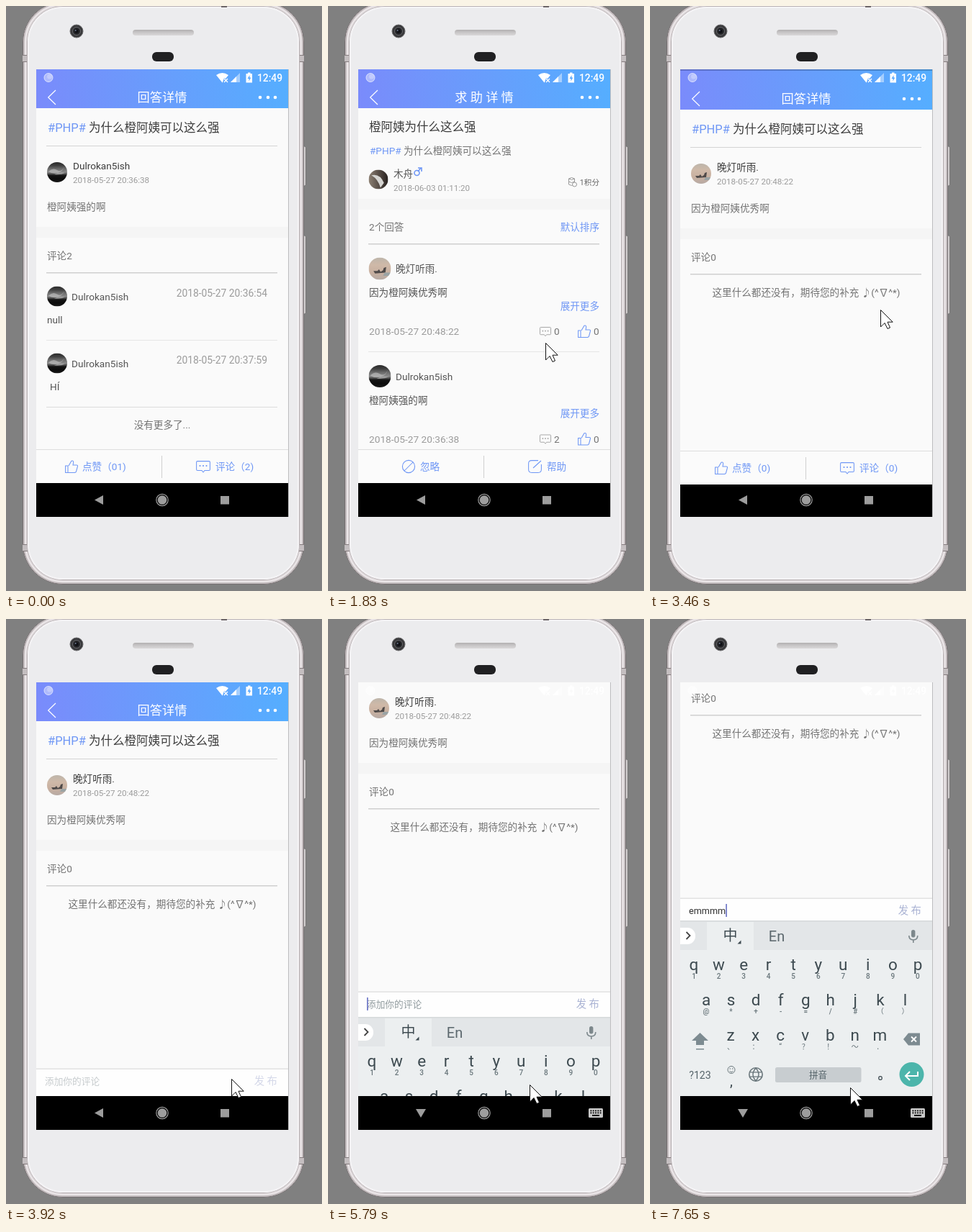
Recreate the animation shown at these times as an HTML page with a canvas. Size 439 by 813 pixels, loop 8 s.

```html
<!DOCTYPE html>
<html lang="zh-CN">
<head>
<meta charset="utf-8">
<title>Answer details</title>
<style>
html, body { margin: 0; width: 100%; height: 100%; overflow: hidden; background: #808080; }
canvas { display: block; }
</style>
</head>
<body>
<canvas id="stage" width="439" height="813"></canvas>
<script>
const W = 439, H = 813, LOOP = 8000;
const FONT = 'Roboto, "Noto Sans CJK SC", "Noto Sans CJK", sans-serif';
const BLUE = '#6f97f5', DARK = '#3c3c3c', MID = '#737373', SOFT = '#9b9b9b', KEY = '#3d4a50';
const USER = 'Dulrokan5ish', WRITER = '晚灯听雨.', STAR = '橙阿姨';
const QUESTION = ` 为什么${STAR}可以这么强`;
const screen = document.getElementById('stage').getContext('2d');
let c = screen;

const clamp = v => Math.max(0, Math.min(1, v));

function layer(draw) {
  const canvas = document.createElement('canvas');
  canvas.width = W;
  canvas.height = H;
  const previous = c;
  c = canvas.getContext('2d');
  draw();
  c = previous;
  return canvas;
}

// y is the optical middle of the line
function text(str, x, y, size, color, align = 'left', weight = 400) {
  c.font = `${weight} ${size}px ${FONT}`;
  c.textAlign = align;
  c.fillStyle = color;
  c.fillText(str, x, y + size * 0.36);
  return c.measureText(str).width;
}

function rect(x, y, w, h, color) {
  c.fillStyle = color;
  c.fillRect(x, y, w, h);
}

function round(x, y, w, h, r, fill, stroke, width = 1) {
  c.beginPath();
  c.roundRect(x, y, w, h, r);
  if (fill) { c.fillStyle = fill; c.fill(); }
  if (stroke) { c.strokeStyle = stroke; c.lineWidth = width; c.stroke(); }
}

const disc = (x, y, r, fill, stroke, width) => round(x - r, y - r, 2 * r, 2 * r, r, fill, stroke, width);

function path(d, x, y, fill, stroke, width = 1.05) {
  const p = new Path2D(d);
  c.save();
  c.translate(x, y);
  if (fill) { c.fillStyle = fill; c.fill(p); }
  if (stroke) { c.strokeStyle = stroke; c.lineWidth = width; c.stroke(p); }
  c.restore();
}

function gradient(x0, y0, x1, y1, ...colors) {
  const g = c.createLinearGradient(x0, y0, x1, y1);
  colors.forEach((color, i) => g.addColorStop(i / (colors.length - 1), color));
  return g;
}

const rule = (y, color = '#d4d4d4', h = 1) => rect(56, y, 321, h, color);

function thumb(x, y) {
  path('M.6 8H4V17.4H.6ZM5 8 9 1.2Q12 0 11.6 4L11 7H16Q18 7 17.4 9L15.5 16Q15 17.4 13.5 17.4H4', x, y, null, BLUE);
}

function bubble(x, y, s, color) {
  c.save();
  c.translate(x, y);
  c.scale(s, s);
  path('M2 .6H18Q19.4.6 19.4 2V12Q19.4 13.4 18 13.4H12L10 16 8 13.4H2Q.6 13.4.6 12V2Q.6.6 2 .6Z', 0, 0, null, color);
  for (const dx of [5.5, 10, 14.5]) disc(dx, 7, 1.1, color);
  c.restore();
}

function avatar(kind, x, y, r) {
  c.save();
  c.beginPath();
  c.arc(x, y, r, 0, 7);
  c.clip();
  c.translate(x, y);
  c.scale(r / 14, r / 14);
  if (kind === 'night') {
    rect(-14, -14, 28, 28, gradient(0, -14, 0, 14, '#2a2a2a', '#3f3f3f', '#6c6c6c', '#8a8a8a', '#141414', '#0c0c0c', '#1a1a1a'));
    path('M-12 -1Q-6 -7 0 -3T10 -8Q8 -1 1 1T-12 -1M-4 3Q3 -1 11 1 5 4 -4 3', 0, 0, 'rgba(205,205,205,.55)');
  } else if (kind === 'sand') {
    rect(-14, -14, 28, 28, gradient(0, -14, 0, 14, '#bdb5aa', '#cfb9a8', '#c8b0a0', '#b7aaa4'));
    path('M-8 3H-3L-1 1 1 4 4 2 5 -1 8 -2 7 5 -6 6Z', 0, 0, '#4f4a49');
    path('M6 5H14V9H4Z', 0, 0, '#9aa3a4');
  } else {
    rect(-14, -14, 28, 28, gradient(-14, 0, 14, 0, '#8c8073', '#5a5049', '#27211f'));
    path('M-10 -6Q2 -9 8 5L3 12Q0 0 -10 -6Z', 0, 0, '#d6d5d2');
  }
  c.restore();
}

function header(title) {
  rect(42, 88, 350, 575, '#fafafa');
  rect(42, 88, 350, 54, gradient(42, 130, 392, 100, '#7a8bfb', '#689dfc', '#55aeff'));
  path('M11 0 .7 10 11 20', 58, 117, null, '#fff', 1.2);
  for (const x of [353, 364, 374]) disc(x, 127, 2.3, '#fff');
  text(title, 217, 127, 17.2, '#fff', 'center');
}

function topic(y, size, color) {
  const w = text('#PHP#', 58, y, size, BLUE);
  text(QUESTION, 58 + w, y, size, color);
}

function footer() {
  rect(42, 617, 350, 46, '#fbfbfb');
  rect(42, 616, 350, 1, '#dedede');
  rect(216, 625, 1, 31, '#cfcfcf');
}

function answerPage({ face, name, date, body, count, likes, comments, bar }) {
  header('回答详情');
  topic(169.5, 16.5, DARK);
  rule(194);
  avatar(face, 71, 231, 14);
  text(name, 93, 222.5, 13.6, DARK);
  text(date, 93, 242, 11.6, SOFT);
  text(body, 57, 279, 13.6, MID);
  rect(42, 307, 350, 15, '#f5f5f5');
  text('评论' + count, 57, 347, 13.6, MID);
  rule(370, '#d0d0d0', 1.5);
  comments.forEach(([when, words, x], i) => {
    const y = i * 93;
    avatar('night', 71, 403.5 + y, 14);
    text(USER, 91, 404 + y, 13.6, '#555');
    text(when, 363, 399 + y, 13.8, SOFT, 'right');
    text(words, x, 436 + y, 13.6, '#555');
    rule(464 + y, i ? '#dcdcdc' : '#e6e6e6');
  });
  if (comments.length) text('没有更多了...', 217, 582, 13.6, MID, 'center');
  else text('这里什么都还没有，期待您的补充 ♪(^∇^*)', 217, 396, 13.6, MID, 'center');
  if (!bar) return;
  footer();
  const x = likes.length > 1 ? 82 : 90;
  thumb(x, 631);
  text(`点赞（${likes})`, x + 24, 640.5, 13.6, BLUE);
  bubble(264, 632, 1, BLUE);
  text(`评论（${count})`, 291, 640.5, 13.6, BLUE);
}

function helpPage() {
  header('求 助 详 情');
  text(STAR + '为什么这么强', 57, 168, 16.5, DARK);
  topic(201, 13.6, MID);
  avatar('child', 70, 241, 13.5);
  text('木舟', 91, 233, 13.6, '#555');
  disc(123.5, 232, 3.5, null, BLUE, 1.6);
  path('M0 5 4 0M0 0H5V5', 125, 225, null, BLUE, 1.6);
  text('2018-06-03 01:11:20', 91, 253, 11.6, SOFT);
  path('M0 2Q4 -1 8 2V10Q4 13 0 10ZM0 2Q4 5 8 2M0 6Q4 9 8 6', 334.5, 238, null, '#999', 1);
  disc(342.5, 248, 3, '#fafafa', '#999', 1);
  text('1积分', 377, 245.5, 10.6, '#666', 'right');
  rect(42, 268, 350, 15, '#f5f5f5');
  text('2个回答', 57, 307, 13.6, MID);
  text('默认排序', 377, 307, 13.6, BLUE, 'right');
  rule(330, '#d0d0d0', 1.5);
  const items = [
    ['sand', WRITER, `因为${STAR}优秀啊`, '2018-05-27 20:48:22', '0'],
    ['night', USER, STAR + '强的啊', '2018-05-27 20:36:38', '2']
  ];
  items.forEach(([face, name, body, date, count], i) => {
    const y = i * 149.5;
    avatar(face, 72, 365 + y, 15.5);
    text(name, 94, 365.5 + y, 13.6, '#555');
    text(body, 57, 398.5 + y, 13.6, '#555');
    text('展开更多', 377, 417 + y, 13.6, BLUE, 'right');
    text(date, 57, 452.5 + y, 13.7, SOFT);
    bubble(294, 446 + y, 0.8, '#999');
    text(count, 314, 452.5 + y, 13.6, MID);
    thumb(347, 443 + y);
    text('0', 369, 452.5 + y, 13.6, MID);
    rule(480 + y, '#e6e6e6');
  });
  footer();
  disc(112, 640, 8.6, null, BLUE, 1.1);
  path('M0 12 12 0', 106, 634, null, BLUE);
  text('忽略', 128, 640.5, 13.6, BLUE);
  path('M14 .6H5Q.6.6.6 5V13Q.6 17.4 5 17.4H14Q18.4 17.4 18.4 13V6M7 11 18 1', 278, 631, null, BLUE);
  text('帮助', 304, 640.5, 13.6, BLUE);
}

// concentric outline of the case, shrunk by an inset
function shell(inset, fill, stroke, width) {
  round(23 + inset, -6 + inset, 391 - 2 * inset, 810 - 2 * inset, 56 - inset, fill, stroke, width);
}

function phone() {
  rect(0, 0, W, H, '#808080');
  for (const [y, h] of [[195, 55], [319, 109]]) round(410.5, y, 6, h, 2, '#d6d2d3', '#777');
  shell(0.5, '#d9d3d5', '#756e70', 1);
  shell(2, null, '#c0b9bb', 1.5);
  shell(4, null, '#ebe6e8', 2);
  for (const y of [68, 748]) for (const x of [23, 407]) {
    rect(x, y, 7, 10, '#c4bec0');
    rect(x, y, 7, 1, '#847c7e');
    rect(x, y + 9, 7, 1, '#847c7e');
  }
  shell(6.5, '#ececee', '#b9b2b4', 1);
  shell(8, null, '#f5f4f6', 2);
  disc(98, 35, 9, '#39393b', '#6a6a6c', 1);
  disc(98, 35, 5.5, '#232427', '#68686c', 1);
  disc(98, 35, 2.5, '#0e0f14');
  disc(96.7, 34, 1, '#6d7890');
  round(176, 33, 85, 8, 4, gradient(0, 33, 0, 41, '#b2afb0', '#c9c7c8', '#dad8d9'));
  round(203, 64, 30, 13, 6, '#202022');
  rect(299, 0, 8, 2, '#6f686a');
  rect(392, 88, 1, 622, '#bdbdbf');
  rect(42, 88, 350, 622, '#000');
}

function statusBar() {
  disc(59, 99.5, 6, 'rgba(255,255,255,.4)', 'rgba(255,255,255,.65)', 1);
  disc(60.5, 98, 3.5, 'rgba(255,255,255,.25)');
  path('M0 3Q8.5 -3 17 3L13 8 11 7 9 13 8.5 13.5Z', 292, 93, '#fff');
  path('M0 0 5 5M5 0 0 5', 303, 101, null, '#fff', 1.3);
  path('M0 13 13 0V13Z', 312, 93, 'rgba(255,255,255,.45)');
  path('M0 13 8 5V13Z', 312, 93, '#fff');
  path('M2.5 0H6V1.5H8.5V14H0V1.5H2.5ZM5 3.5 2 8.5H4V12L6.8 7H5Z', 333.5, 92.5, '#fff');
  text('12:49', 384, 100, 13.8, '#fff', 'right', 500);
}

function navIcons(typing) {
  const gray = '#9d9d9d';
  if (typing) {
    path('M0 0H14L7 12Z', 122, 681, gray);
    round(362, 680, 20, 13, 1.5, '#c8c8c8');
    for (let i = 0; i < 10; i++) rect(364.5 + i % 5 * 3.3, 682.5 + (i > 4) * 3, 1.8, 1.8, '#000');
    rect(367, 689, 10, 1.8, '#000');
  } else path('M12 0V13L0 6.5Z', 123, 680, gray);
  disc(217, 686.5, 8.2, null, gray, 1.2);
  disc(217, 686.5, 6.3, gray);
  rect(298, 681, 12, 11.5, gray);
}

function inputBar(typed, caret, shown) {
  rect(42, 625, 350, 38, '#fefefe');
  rect(42, 624.5, 350, 1.5, '#e2e2e2');
  c.globalAlpha = shown;
  const w = typed ? text(typed, 54, 642.5, 12.7, '#333') : 0;
  if (!typed) text('添加你的评论', 54, 642.5, 12.7, '#929c9f');
  text('发 布', 377, 642, 14.4, '#a9b2d3', 'right');
  c.globalAlpha = 1;
  if (caret) rect(54 + w, 633, 1.7, 18, '#6f78c8');
}

function toolbar() {
  rect(79, 421, 65, 40, '#eceff0');
  round(42, 429, 21, 23, [0, 11, 11, 0], '#fff');
  path('M0 0 5 5 0 10', 50.5, 435, null, '#444', 1.8);
  text('中', 111.5, 440, 20, KEY, 'center');
  path('M5 0V5H0Z', 121.5, 446.5, KEY);
  text('En', 176, 440.5, 20, '#5c686e', 'center');
  round(363, 432, 5.4, 10.5, 2.7, '#7d888c');
  path('M0 0Q0 6 6 6T12 0M6 6V10', 359.8, 440, null, '#7d888c', 1.6);
}

function candidates(typed) {
  const words = typed.length < 2 ? ['呃', '额', '饿', '恶', '鹅', '嗯'] : ['嗯', '呃么', '恶魔', typed];
  let x = 56;
  for (const word of words) x += text(word, x, 440, 17, KEY) + 30;
  path('M0 0 6 6 12 0', 360, 437, null, '#7d888c', 1.8);
}

function keyRow(letters, hints, x, y, composing) {
  [...letters].forEach((letter, i) => {
    const cx = x + i * 34.55;
    c.font = `22.5px ${FONT}`;
    c.textAlign = 'center';
    c.fillStyle = KEY;
    c.fillText(letter, cx, y);
    if (!composing) text(hints[i], cx, y + 8.5, 10, '#69767b', 'center', 500);
  });
}

function keyboard(typed, composing) {
  rect(42, 420, 350, 243, '#eceff0');
  rect(42, 420, 350, 40, '#e3e6e8');
  rect(42, 419, 350, 1.5, '#d6dadb');
  if (composing) candidates(typed); else toolbar();
  keyRow('qwertyuiop', '1234567890', 61, 488, composing);
  keyRow('asdfghjkl', '@*+-=/#（）', 78, 537, composing);
  keyRow('zxcvbnm', '、：“？！～．', 112, 586, composing);
  path('M11.5 0 23 11H17V17H6V11H0Z', 58, 575, '#7d8b91');
  rect(64, 597, 11, 1.5, '#7d8b91');
  path('M7 0H23V17H7L0 8.5Z', 352, 575.5, '#7d8b91');
  path('M0 0 7 7M7 0 0 7', 363, 580.5, null, '#fff', 1.8);
  text('?123', 69.5, 634, 14.2, '#56646a', 'center');
  disc(113, 626.5, 5, null, '#69767b', 1);
  path('M0 0Q2.5 3.5 5 0', 110.5, 628, null, '#69767b', 1);
  disc(111.2, 625, 0.8, '#69767b');
  disc(114.8, 625, 0.8, '#69767b');
  text(',', 113, 641.5, 20, KEY, 'center');
  disc(147, 633, 9.2, null, '#69767b', 1.6);
  path('M-9 -3.2H9M-9 3.2H9M0 -9Q-8 0 0 9M0 -9Q8 0 0 9', 147, 633, null, '#69767b', 1.3);
  round(174, 623, 119.5, 21, 2.5, '#c8cdd0');
  text('拼音', 233.5, 633.5, 12.6, '#56646a', 'center');
  disc(320, 638, 2.3, null, KEY, 1.2);
  disc(363.5, 633, 17, '#4cb5ab');
  path('M17 0V6H1M6 0 0 6 6 12', 355, 629, null, '#fff', 2);
}

const noted = { face: 'night', name: USER, date: '2018-05-27 20:36:38', body: STAR + '强的啊',
  count: 2, likes: '01', bar: true,
  comments: [['2018-05-27 20:36:54', 'null', 57], ['2018-05-27 20:37:59', 'HÍ', 61]] };
const quiet = { face: 'sand', name: WRITER, date: '2018-05-27 20:48:22', body: `因为${STAR}优秀啊`,
  count: 0, likes: '0', bar: true, comments: [] };

const device = layer(phone);
const help = layer(helpPage);
const first = layer(() => answerPage(noted));
const second = layer(() => answerPage(quiet));
const writing = layer(() => answerPage({ ...quiet, bar: false }));

// [start, end, steps]: the picture holds still between these moments
const bursts = [[0, 0, 1], [70, 70, 1], [220, 910, 10], [1060, 1220, 3], [1450, 2220, 11], [2370, 2600, 4],
  [2770, 2770, 1], [2920, 2920, 1], [3300, 3920, 9], [4300, 4300, 1], [4530, 4530, 1], [5080, 5080, 1],
  [5250, 5320, 2], [5470, 5470, 1], [5640, 5640, 1], [5790, 5950, 3], [6100, 6180, 2], [6330, 6330, 1],
  [6560, 6560, 1], [6960, 6960, 1], [7110, 7340, 4], [7570, 7650, 2]];
const moments = bursts.flatMap(([a, b, n]) =>
  Array.from({ length: n }, (_, i) => Math.floor((a + (b - a) * i / Math.max(1, n - 1)) / 10) * 10));
const hold = t => moments.findLast(m => m <= t);

const route = [[70, 314, 769], [150, 314, 769], [910, 76, 131], [980, 76, 131], [1220, 66, 130], [1450, 74, 122],
  [1510, 74, 122], [1830, 302, 468], [2060, 301, 666], [2220, 297, 643], [2600, 323, 408], [2770, 331, 413],
  [2920, 332, 414], [3300, 332, 414], [3450, 320, 422], [3760, 316, 676], [3920, 313, 639], [4300, 313, 639],
  [4530, 311, 639], [5080, 310, 639], [5320, 280, 647], [6020, 280, 647], [6180, 278, 650], [6330, 278, 651]];

function pointer(t) {
  if (t < 70) return;
  const i = route.findLastIndex(k => k[0] <= t);
  const a = route[i], b = route[i + 1] || a;
  const p = b === a ? 0 : (t - a[0]) / (b[0] - a[0]);
  const e = p * p * (3 - 2 * p);
  path('M.5.5V24L6 18.5 10 26.5 13.5 25 10 17.2H17.2Z',
    Math.round(a[1] + (b[1] - a[1]) * e), Math.round(a[2] + (b[2] - a[2]) * e), '#fff', '#111', 1);
}

function sheet(image, dy = 0, alpha = 1) {
  c.globalAlpha = alpha;
  c.drawImage(image, 0, Math.round(dy));
  c.globalAlpha = 1;
}

function pages(t) {
  if (t < 1520) sheet(first);
  else if (t < 3300) {
    sheet(help);
    sheet(first, 50 * clamp((t - 1500) / 250) ** 3, 1 - clamp((t - 1560) / 150));
  } else if (t < 3840) {
    const alpha = clamp((t - 3285) / 165);
    sheet(help);
    rect(42, 88, 350, 575, `rgba(0,0,0,${0.2 * alpha})`);
    sheet(second, 50 * (1 - clamp((t - 3285) / 350)) ** 5, alpha);
  } else editor(t);
}

function editor(t) {
  const rise = t < 5790 ? 0 : t < 5860 ? 0.45 : t < 5950 ? 0.85 : 1;
  const lift = Math.round(237 * rise);
  const composing = t >= 6960 && t < 7570;
  const letters = t < 6960 ? 0 : t < 7110 ? 1 : Math.min(5, 2 + Math.floor((t - 7105) / 75));
  const typed = 'emmmm'.slice(0, letters);
  const caret = t >= 5470 && t < 6100 || t >= 6560;
  c.save();
  c.beginPath();
  c.rect(42, 88, 350, 575);
  c.clip();
  rect(42, 88, 350, 575, '#fafafa');
  c.translate(0, -lift);
  c.drawImage(writing, 0, 0);
  inputBar(typed, caret, t < 4300 ? 0.5 : 1);
  c.translate(0, lift + Math.round(244 * (1 - rise)));
  if (rise) keyboard(typed, composing);
  c.restore();
}

function render(t) {
  c.drawImage(device, 0, 0);
  c.save();
  c.beginPath();
  c.rect(42, 88, 350, 622);
  c.clip();
  pages(t);
  c.restore();
  statusBar();
  navIcons(t >= 5640);
  pointer(t);
}

const start = performance.now();
function tick() {
  render(hold((performance.now() - start) % LOOP));
  requestAnimationFrame(tick);
}
tick();
</script>
</body>
</html>
```
